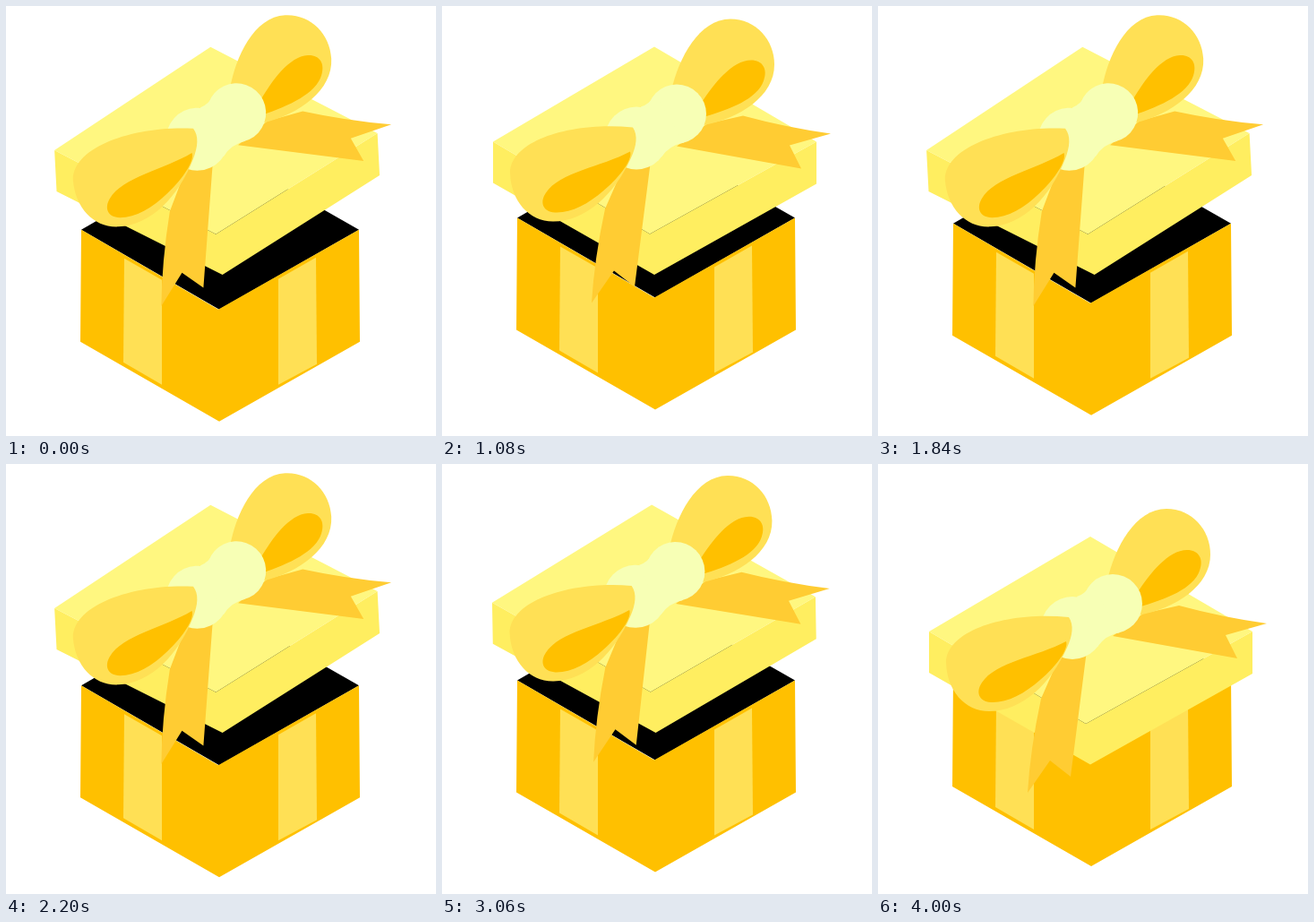
An HTML page that plays this animation: 480x480 px, repeating every 5.94 s.

```html
<!DOCTYPE html>
<html lang="en">
<head>
<meta charset="utf-8">
<title>Gift box</title>
<style>
  html, body { margin: 0; width: 100%; height: 100%; overflow: hidden; background: #fff; }
  svg { display: block; width: 100%; height: 100%; }
  .gold { fill: #ffc000; }
  .band { fill: #ffe055; }
  .tail { fill: #ffcc33; }
  .side { fill: #ffee60; }
  .top { fill: #fff780; }
  .knot { fill: #f7ffb5; }
</style>
</head>
<body>
<svg viewBox="0 0 480 480">
  <g id="box">
    <path d="M84 235L238 146L394 235L238 324Z"/>
    <path class="gold" d="M84 235L237 324L394 235L395 360L238 449L83 360Z"/>
    <path class="band" d="M132 267L174 291V408L131 383Z"/>
    <path class="band" d="M304 290L346 266L347 385L304 408Z"/>
  </g>
  <g id="lid">
    <path class="side" d="M57 187L232 290L418 187V234L237 335.500L57 233Z"/>
    <path class="top" d="M237 81L418 187L232 290L57 187Z"/>
    <path class="tail" d="M262 192L296 167L336 158Q384 171 434 178L388 191L401 217Z"/>
    <path class="tail" d="M207 205L233 208L215 349L192 331L167 367Q170 318 182 262Z"/>
    <path class="band" d="M256 130C264 94 287 50 322 50C350 50 371 73 371 101C371 136 333 161 290 169Z"/>
    <path class="gold" d="M290 160V143C303 123 324 96 345 96C358 96 364 106 359 119C352 139 322 151 290 160Z"/>
    <g class="knot">
      <circle cx="262" cy="156" r="33"/>
      <circle cx="217" cy="183" r="35"/>
      <path d="M222 148Q232 145 238 134L270 188Q254 191 245 204Z"/>
    </g>
    <path class="band" d="M213 171C219 180 217 192 211 205C193 245 161 276 124 276C97 276 77 253 76 222C76 185 146 164 213 171Z"/>
    <path class="gold" d="M210 198C213 206 200 225 181 241C163 257 143 267 126 266C112 265 109 254 116 244C131 221 178 215 210 198Z"/>
  </g>
</svg>
<script>
const LOOP = 5940, STEP = 20;
const SHUT = 3600, DROP = 3560, END = 4000;
const LIFT = 35.5, SINK = 14.7;
const sway = [-3, -3, -1, 0, 1.2, 4]; // half a rock, played back and forth
const box = document.getElementById('box');
const lid = document.getElementById('lid');

function angleAt(t) {
  const k = (t / STEP + 9) % 10;
  return sway[Math.min(k, 10 - k)];
}

function draw(now) {
  const t = Math.floor(now % LOOP / STEP) * STEP;
  const open = t < SHUT;
  const sink = open ? SINK * Math.abs(1 - t % 2400 / 1200) : 0;
  const lift = open ? LIFT : LIFT * Math.max(0, (END - t) / (END - DROP));
  const angle = open ? angleAt(t) : 0;
  box.setAttribute('transform', `translate(0 ${sink})`);
  lid.setAttribute('transform', `translate(0 ${-lift}) rotate(${angle} 237 247)`);
}

const start = performance.now();
function tick() {
  draw(performance.now() - start);
  requestAnimationFrame(tick);
}
tick();
</script>
</body>
</html>
```
